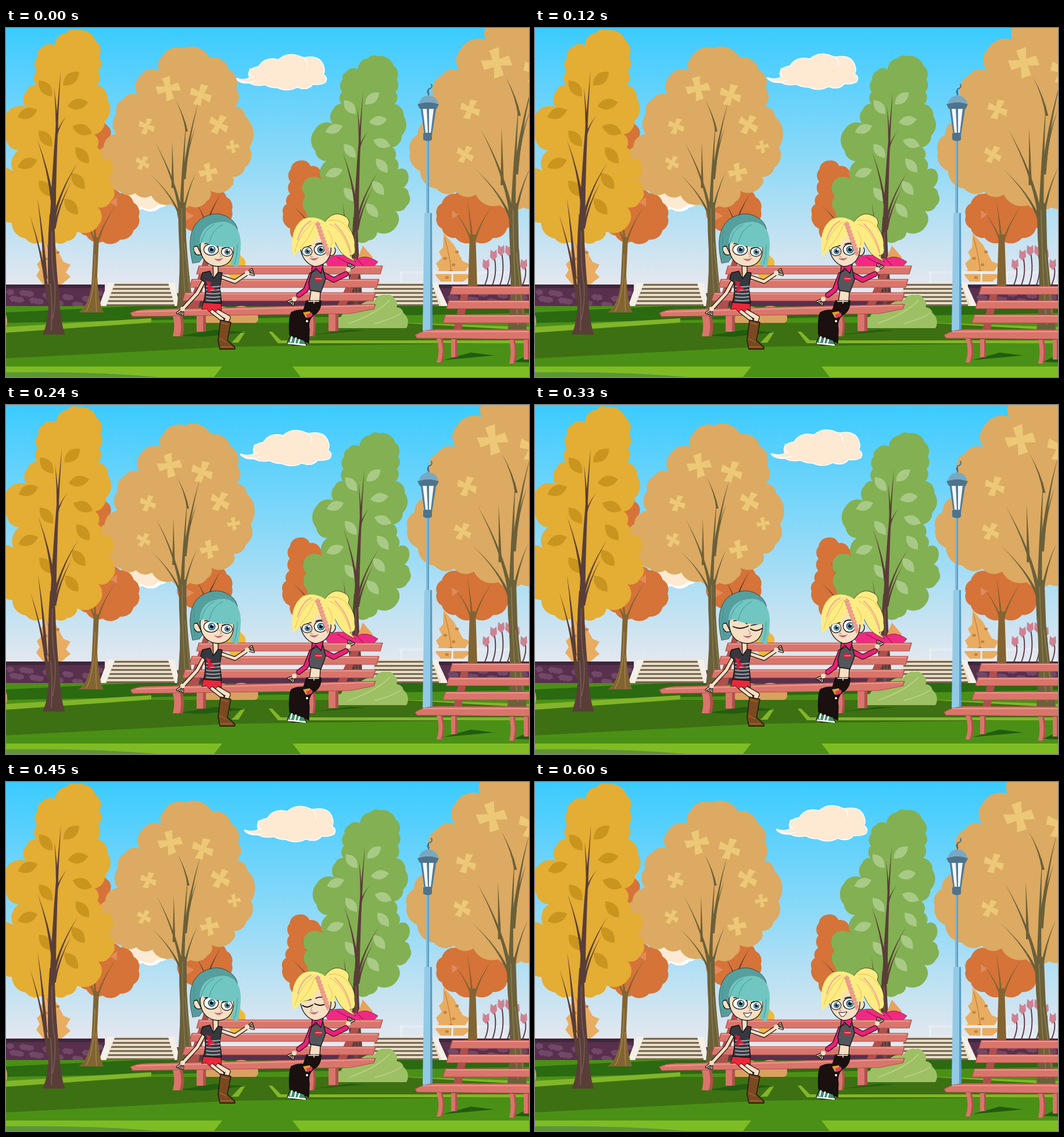
Recreate the animation shown at these times as an HTML page with a canvas. Size 900 px wide and 600 px high, loop 690 ms.

```html
<!DOCTYPE html>
<html lang="en">
<head>
<meta charset="utf-8">
<title>Park bench</title>
<style>
  html, body { margin: 0; width: 100%; height: 100%; overflow: hidden; }
  canvas { display: block; }
</style>
</head>
<body>
<canvas id="stage" width="900" height="600"></canvas>
<script>
const ctx = document.getElementById('stage').getContext('2d');
ctx.lineCap = ctx.lineJoin = 'round';

const INK = '#15100f', SKIN = '#f6dfc3', WOOD = '#da756c', EDGE = '#ae504c';
const RUST = '#d57338', BARK = '#826432', OLIVE = '#6b603a', BROWN = '#593e38';

const fill = (color, d) => { ctx.fillStyle = color; ctx.fill(new Path2D(d)); };
const line = (color, width, d) => {
  ctx.strokeStyle = color;
  ctx.lineWidth = width;
  ctx.stroke(new Path2D(d));
};
const inked = (color, d, width = 1.3) => { fill(color, d); line(INK, width, d); };
const limb = (color, width, d) => { line(INK, width + 2.4, d); line(color, width, d); };
const oval = (color, x, y, rx, ry = rx) => {
  ctx.fillStyle = color;
  ctx.beginPath();
  ctx.ellipse(x, y, rx, ry, 0, 0, 7);
  ctx.fill();
};

// Clockwise key points joined by rows of small outward bumps.
function scallop(color, p, { size = 30, flat = false } = {}) {
  let d = `M${p[0]} ${p[1]}`;
  for (let i = 0; i < p.length - (flat ? 2 : 0); i += 2) {
    const dx = p[(i + 2) % p.length] - p[i], dy = p[(i + 3) % p.length] - p[i + 1];
    const length = Math.hypot(dx, dy), n = Math.max(1, Math.round(length / size)), r = length / n * 0.75;
    for (let k = 1; k <= n; k++) d += `A${r} ${r} 0 0 1 ${p[i] + dx * k / n} ${p[i + 1] + dy * k / n}`;
  }
  fill(color, d + 'Z');
}

// Bumpy ellipse.
function puff(color, x, y, rx, ry, bumps) {
  const p = [];
  for (let i = 0; i < bumps; i++) {
    const a = i * 2 * Math.PI / bumps;
    p.push(x + rx * 0.95 * Math.cos(a), y + ry * 0.95 * Math.sin(a));
  }
  scallop(color, p, { size: 99 });
}

// Tapering branches from tip to foot.
function twigs(color, list) {
  for (const [x, y, u, v] of list) {
    const h = 1 + Math.hypot(u - x, v - y) * 0.016, bx = u * 0.75 + x * 0.25, by = (y + v) / 2;
    fill(color, `M${x} ${y}Q${bx - h / 2} ${by} ${u - h} ${v}H${u + h}Q${bx + h / 2} ${by} ${x} ${y}Z`);
  }
}

function at(x, y, turn, scale, draw) {
  ctx.save();
  ctx.translate(x, y);
  ctx.rotate(turn);
  ctx.scale(scale, scale);
  draw();
  ctx.restore();
}
const leaf = (color, x, y, degrees) => at(x, y, degrees * Math.PI / 180, 1,
  () => fill(color, 'M-18 0Q0-19 18 0Q0 18-18 0Z'));
const blossom = (x, y, r, turn) => at(x, y, turn, r, () => {
  for (let i = 0; i < 4; i++, ctx.rotate(Math.PI / 2)) fill('#ecc877', 'M-.17 .17L-.32-.9L.36-1L.17 .17Z');
});

function track(t, keys) {
  const i = Math.max(1, keys.findIndex(k => k[0] >= t));
  const [[t0, a], [t1, b]] = [keys[i - 1], keys[i]];
  return a + (b - a) * (t - t0) / (t1 - t0);
}

// Place a tree and lean it from its base; shift is the lean at its own y = 0.
function plant(x, y, scale, shift, base, draw) {
  ctx.save();
  ctx.transform(scale, 0, -scale * shift / base, scale, x + scale * shift, y);
  draw();
  ctx.restore();
}

function sky(t) {
  const g = ctx.createLinearGradient(0, 0, 0, 450);
  ['#3bcbff', '#8dd9f8', '#e7e8ee'].forEach((c, i) => g.addColorStop(i / 2, c));
  ctx.fillStyle = g;
  ctx.fillRect(0, 0, 900, 600);
  puff('#fff', 243, 298, 38, 14, 7);
  puff('#fee9d2', 240, 295, 36, 13, 7);
  const cloud = 'M396 87Q410 92 420 86Q413 70 435 67Q446 49 469 55Q487 39 512 52Q540 46 546 66Q549 74 545 80Q554 85 549 93Q540 98 528 96Q519 108 501 101Q486 110 467 102Q454 102 446 97Q430 100 419 94Q403 95 396 87Z';
  at(t / 30, -t / 120, 0, 1, () => {
    line('#fff', 3, cloud);
    fill('#fee9d2', cloud);
    line('#fff', 1.5, 'M397 88Q415 97 430 91M425 86Q416 81 420 70M512 50Q520 58 518 65');
  });
}

function backTrees(t) {
  puff(RUST, 163, 187, 17, 27, 7);
  puff(RUST, 174, 324, 57, 46, 11);
  puff(RUST, 342, 313, 49, 40, 10);
  puff(RUST, 806, 323, 68, 46, 12);
  plant(0, 0, 1, track(t, [[0, 0], [330, -4], [600, -4]]), 440, () => {
    scallop(RUST, [506, 228, 542, 247, 550, 290, 540, 365, 505, 369, 489, 345, 477, 320, 489, 285, 490, 243], { size: 24 });
    twigs(BROWN, [[510, 268, 531, 340], [494, 306, 528, 350], [537, 264, 526, 312]]);
  });
  twigs(BROWN, [[328, 302, 348, 350], [370, 285, 344, 345]]);
  fill('#e28a5a', 'M309 315l15 8-14 8ZM179 300l12-9 0 16ZM767 314l13 6-12 8Z');
  for (const x of [155, 803]) twigs(BARK, [[x + 34, 305, x, 378], [x - 33, 312, x, 374], [x - 9, 296, x, 380]]);
  fill(BARK, 'M125 489Q147 473 148 425L151 360H160L157 425Q159 472 168 489ZM798 355H808L811 445H795Z');
  line('#a98a50', 1.2, 'M153 390Q153 460 138 487M155 430Q154 470 156 488');
}

const leafBush = (x, y) => at(x, y, 0, 1, () => {
  fill('#e8ad61', 'M12 0L30 20L45 48L57 53L49 66L57 74L40 88H11L-2 72L4 62L-1 52L9 42L4 32L11 24Z');
  line('#c58342', 1.4, 'M14 8Q25 45 27 87');
  for (let i = 0; i < 5; i++) oval('#c58342', 24 + 11 * Math.cos(i * 2.6), 32 + i * 11, 3.2, 2.5);
});

function wall() {
  leafBush(54, 354);
  leafBush(741, 353);
  fill('#e3ebf2', 'M676 418H900V423H676ZM676 436H900V441H676Z');
  for (let x = 680; x < 900; x += 44) line('#e9f1f5', 3, `M${x} 420V440`);
  for (let i = 0; i < 6; i++) {
    const x = 826 + i * 13, y = 380 + 4 * (i - 2.5) ** 2;
    line('#613d4d', 2, `M${x} ${y}Q${x + 8} 420 ${x - 3} 444`);
    fill('#cd8292', `M${x - 5} ${y - 8}l5 4 5-4 1 12-6 7-6-6Z`);
  }
  fill('#58304d', 'M0 445H170V478H0ZM745 445H900V478H745ZM290 456H640V478H290Z');
  for (let i = 0; i < 110; i++) {
    const x = i * 17 % 907, y = 453 + i * 13 % 23;
    if (x < 165 || x > 748) fill('#724767', `M${x} ${y}l6-4 7 2 1 6-9 3Z`);
  }
  fill('#3f263b', 'M0 441H170V447H0ZM745 441H900V447H745Z');
  fill('#e7ddc7', 'M175 438H290L299 479H160ZM632 438H737L763 486H632Z');
  for (let i = 0; i < 6; i++) {
    const y = 440 + i * 7;
    fill('#766651', `M${187 - i * 2.7} ${y}H${280 + i * 2}v3H${186 - i * 2.7}ZM634 ${y}H${734 + i * 2.2}v3H634Z`);
  }
  fill('#f4f0e8', 'M175 438H187L171 479H160ZM279 438H290L299 479H291ZM733 438H742L764 486H753Z');
}

function lawn() {
  fill('#4b9016', 'M0 478H900V600H0Z');
  fill('#2b6a10', 'M0 489L230 478H900V490L0 507Z');
  fill('#83b52a', 'M0 514L250 499V506L0 524ZM660 506L900 514V521L660 512Z');
  fill('#3d7012', 'M0 524L250 507H680L900 520V541L390 548L0 568Z');
  fill('#83b52a', 'M406 522H412L400 541H388ZM452 522H458L473 537H900V542H468Z');
  fill('#7ebc25', 'M0 582H372L358 600H0ZM493 582H900V600H507Z');
  fill('#5d9535', 'M0 592Q150 590 262 600H0Z');
  oval('#d8a466', -2, 504, 4, 12);
}

function roundTree() {
  scallop('#dcaa62', [304, 35, 350, 50, 384, 72, 396, 104, 394, 135, 412, 152, 419, 205, 411, 240, 390, 256, 388, 272, 352, 280, 345, 298, 316, 306, 284, 303, 250, 288, 195, 280, 172, 255, 158, 228, 168, 205, 190, 182, 190, 148, 202, 122, 228, 115, 228, 86, 264, 72, 268, 50], { size: 36 });
  [[279, 104], [335, 115], [366, 166], [348, 248], [242, 169], [235, 232], [390, 204]]
    .forEach(([x, y], i) => blossom(x, y, 21 - i * 1.6, [-0.2, 0.35, 0.5][i % 3]));
  twigs(OLIVE, [[331, 128, 306, 260], [292, 124, 311, 178], [310, 160, 302, 320], [257, 197, 300, 315], [286, 195, 287, 275], [249, 252, 300, 325], [326, 170, 308, 245], [327, 248, 305, 320]]);
  fill(OLIVE, 'M296 300H309L310 360Q313 410 323 490H293Q302 420 297 350Z');
  line('#8c8050', 1.2, 'M302 310Q303 400 309 470M307 370Q312 420 317 460');
}

function tallTree(crown, leaves) {
  scallop(crown, [122, 4, 154, 22, 160, 50, 156, 98, 174, 122, 170, 160, 152, 183, 162, 227, 180, 229, 174, 262, 184, 275, 180, 298, 158, 308, 160, 338, 122, 350, 105, 366, 60, 368, 34, 362, 10, 335, -18, 310, -20, 248, 12, 246, 22, 210, 0, 190, 0, 148, 34, 136, 36, 108, 52, 98, 54, 50, 62, 34, 84, 30, 104, 8]);
  for (let i = 0; i < 6; i++) leaf(leaves, 112 + 20 * Math.sin(i * Math.PI / 5), 87 + 44 * i, Math.min(50, 30 * i - 40));
  for (let i = 0; i < 5; i++) leaf(leaves, i % 2 ? 37 : 68, 104 + 43 * i, i % 2 ? -20 : 50);
  twigs(BROWN, [[94, 74, 80, 345], [83, 103, 88, 178], [104, 151, 87, 185], [54, 192, 80, 300], [123, 232, 82, 330], [112, 265, 83, 345], [41, 322, 73, 470], [54, 292, 68, 430]]);
  fill(BROWN, 'M75 320H83Q85 400 91 455Q94 510 102 527H63Q75 502 73 450Q70 385 75 320Z');
  line('#7a5a58', 1.6, 'M79 350Q78 410 84 440Q86 475 80 500M76 440Q80 460 78 520');
}

function shrubs() {
  puff('#edba3b', 396, 410, 16, 23, 7);
  fill('#e9a25c', 'M604 400L614 374L631 394L626 404Z');
  inked('#f02a82', 'M548 398Q572 383 604 397Q620 388 640 402L633 410H555Z', 0.5);
  line('#b81561', 1.5, 'M602 395L615 409M570 394L590 405');
  scallop('#9dc064', [556, 516, 576, 497, 634, 470, 655, 459, 668, 465, 672, 480, 684, 490, 689, 516], { flat: true });
  line('#c3d78c', 1.3, 'M590 508Q640 490 660 468M635 508Q665 500 680 490');
  scallop('#d9a15f', [345, 507, 352, 486, 422, 484, 434, 500, 428, 507], { flat: true });
}

function plank(d) { fill(WOOD, d); line(EDGE, 1.2, d); }
function slat(x, y, end, height) {
  plank(`M${x} ${y}H${end}l-4 ${height}H${x - 4}Z`);
  line('#eb968b', 2, `M${x + 2} ${y + 2}H${end - 4}`);
}
function leg(x, y, width, height, bend = 0) {
  const d = w => `M${x} ${y}h${w}q${bend} ${height / 2} 0 ${height}h${-w}q${bend} ${-height / 2} 0 ${-height}Z`;
  fill(EDGE, d(width));
  fill(WOOD, d(width * 0.7));
}

function bench() {
  fill('#225c10', 'M298 529L360 519L415 523L340 531ZM521 528L590 519L620 520Z');
  fill(EDGE, 'M342 392H352L330 486H312ZM596 420H609L585 478H570Z');
  for (let i = 0; i < 3; i++) slat(332 - i * 12, 409 + i * 23, 648 - i * 6, 14);
  leg(287, 495, 17, 35, 5);
  leg(328, 493, 16, 29);
  leg(519, 492, 12, 38, 4);
  leg(555, 490, 17, 31);
  plank('M214 490Q222 485 240 484L636 475L633 483L592 491L218 496Z');
  line('#eb968b', 2, 'M225 488L632 477');
}

function rightBench() {
  fill('#225c10', 'M752 571L800 558L840 563ZM874 574L900 562V575Z');
  fill(EDGE, 'M786 443H799L784 519H770Z');
  for (let i = 0; i < 3; i++) slat(768 - i * 6, 444 + i * 24.5, 910, 14);
  leg(741, 534, 10, 41, 7);
  leg(766, 535, 10, 31);
  leg(866, 536, 10, 41, 5);
  leg(891, 536, 10, 34);
  plank('M704 528Q716 520 740 518L902 519V535L707 533Z');
  line('#eb968b', 2, 'M718 522L900 522');
}

function lamp() {
  line('#4b7289', 2, 'M727 119V105Q735 103 732 97M727 106Q723 111 728 113');
  fill('#7cb9d9', 'M723 190H728V320H723Z');
  fill('#93cae6', 'M720 318H733V520Q727 524 717 520Z');
  fill('#5b9ac0', 'M730 318H733L734 521H730ZM726 190H728V318H726Z');
  fill('#557b95', 'M713 134H741L733 184H720Z');
  fill('#f4f8fb', 'M717 138H724L726 180H722ZM728 138H736L731 180H728Z');
  fill('#4e748d', 'M708 131Q727 124 745 131L741 139H712ZM718 181H733V192Q727 197 718 192Z');
  fill('#77a9c4', 'M710 130Q715 116 727 116Q741 117 744 130Q727 125 710 130Z');
}

function eye(x, y, rx, ry, mode) {
  if (mode === 'shut') {
    line(INK, 1.8, `M${x - rx} ${y}Q${x} ${y + 6} ${x + rx} ${y}m0 0l2-1`);
    return;
  }
  const grow = mode === 'wide' ? 1 : 0;
  const top = y - grow;
  oval(INK, x, top, rx + 1.2, ry + 1.2 + grow);
  oval('#fff', x, top, rx, ry + grow);
  [['#20485a', 0.72], ['#58a7bd', 0.58], ['#111', 0.34]].forEach(([c, k]) => oval(c, x + 1, top, ry * k));
  oval('#fff', x + 3, top - 3, 1.6);
}

function mouth(x, y, grin) {
  if (grin) inked('#fff', `M${x - 7} ${y - 2}Q${x} ${y} ${x + 7} ${y - 3}Q${x + 3} ${y + 7} ${x - 3} ${y + 5}Z`, 1);
  else {
    fill('#d9788c', `M${x - 6} ${y - 1}Q${x} ${y - 2} ${x + 6} ${y - 2}Q${x + 1} ${y + 5} ${x - 6} ${y - 1}Z`);
    line('#703448', 0.8, `M${x - 7} ${y - 2}Q${x} ${y + 1} ${x + 7} ${y - 3}`);
  }
}

function hand(x, y, dx, dy) {
  for (let i = -1; i < 3; i++) limb(SKIN, 1.8, `M${x} ${y}l${dx - dy * i * 0.35} ${dy + dx * i * 0.35}`);
  oval(SKIN, x, y, 4);
}

function tealGirl(eyes, grin) {
  inked('#559f9e', 'M321 404Q308 350 334 329Q365 309 390 331Q401 342 398 357L340 392L333 402Z', 0.6);
  limb(SKIN, 5, 'M343 430Q335 445 329 456L306 481');
  hand(304, 483, -3, 9);
  limb(SKIN, 5, 'M371 428L394 436L412 424');
  hand(415, 421, 9, -3);
  limb(SKIN, 7, 'M357 484L382 498L377 510');
  limb(SKIN, 5, 'M354 487L372 501');
  inked('#7b491f', 'M369 502L387 506Q383 527 381 537L394 549V552H368L365 537Z');
  line('#b57936', 1, 'M371 507L382 510M368 534L379 540M369 548H389');
  inked(SKIN, 'M356 402H365V422L357 432Z');
  inked('#36383f', 'M338 421L351 418L357 431L365 420L372 421L368 446L371 473L340 472Q345 452 342 437L335 432Z');
  for (let y = 444; y < 472; y += 6) line('#9fa8af', 1.8, `M345 ${y}Q356 ${y + 2} 368 ${y}`);
  fill('#df1d3b', 'M344 434L354 438L350 441L364 452L351 449L353 457L346 451L348 445Z');
  inked('#e8283a', 'M340 472L370 474L371 486L365 483L361 488L355 484L350 488L345 483L337 484Z', 0.8);
  inked(SKIN, 'M329 375Q320 375 324 384Q327 393 336 389Z');
  inked(SKIN, 'M334 378Q333 350 363 347Q393 349 392 382Q389 409 365 410Q337 408 334 378Z');
  eye(353, 381, 12, 9, eyes);
  eye(380, 385, 9, 7, eyes);
  line(INK, 1.7, 'M342 371Q354 368 365 376M372 379L390 375');
  line('#ad846d', 1, 'M367 386l4 7-3 1');
  mouth(366, 399, grin);
  fill('#71c6c2', 'M333 371Q334 334 375 333Q403 336 404 370Q404 390 399 411Q390 409 386 405Q394 391 392 377Q364 378 346 370Q340 367 333 371Z');
  line('#3f9698', 1, 'M335 372Q340 346 358 338M350 369Q355 345 373 338M398 373Q398 393 393 406M324 350Q321 374 325 397');
}

function blondeGirl(eyes, grin) {
  const hair = '#fdec83', pink = '#eb2077';
  inked(hair, 'M548 334Q560 317 574 320Q595 326 589 340Q602 361 600 374Q604 391 592 391Q599 399 602 402Q580 394 572 379Z', 0.7);
  line('#e9b94e', 1, 'M557 337Q582 347 596 399M555 331Q580 326 592 350');
  line('#f0aa99', 2, 'M566 337Q587 357 593 386');
  limb(pink, 7, 'M546 424L564 433L585 423');
  hand(589, 415, 4, -8);
  limb(pink, 7, 'M526 424Q520 440 516 450L504 459');
  hand(496, 466, -5, 8);
  inked(SKIN, 'M525 450L541 452L540 471H522Z');
  inked('#53565b', 'M526 420L545 411L550 432L542 454L523 451L521 438Z');
  inked(pink, 'M527 404L546 407L542 422L533 413L526 421Z');
  fill('#d81f35', 'M531 428Q537 424 541 429L546 431Q538 440 531 432Z');
  line('#fff', 0.8, 'M533 431H543');
  inked('#19100f', 'M517 469L542 469Q543 486 529 494Q519 502 522 518L521 542L488 528Q486 500 491 489Q500 484 512 485Z');
  line('#c7c0b8', 2, 'M521 470H538M530 468v5');
  fill('#e5a02d', 'M511 489l12-2 3 9-10 2Z');
  fill('#de3b65', 'M516 493l10-4 2 5-9 5Z');
  oval('#fff', 518, 504, 2);
  inked('#3e8e69', 'M489 530L513 537L517 545H492L484 541Z');
  line('#fff', 2.5, 'M492 531l-2 8M499 533l-2 8M505 536l-2 6M486 542L515 545');
  inked(SKIN, 'M557 378Q567 374 567 383Q565 393 557 391Z');
  inked(SKIN, 'M506 375Q512 349 537 350Q562 355 559 384Q555 408 531 410Q509 403 506 375Z');
  eye(518, 384, 8, 7, eyes);
  eye(541, 381, 10, 9, eyes);
  line(INK, 1.5, 'M509 377L525 374M533 372Q542 367 551 373');
  line('#ad846d', 1, 'M527 386l-3 7 4 1');
  mouth(530, 398, grin);
  fill(hair, 'M494 394Q486 345 512 328Q538 320 557 341Q571 360 564 381Q558 377 555 374L552 392Q544 363 535 357Q531 374 512 377Q503 383 494 394Z');
  line('#eabc56', 1, 'M497 384Q506 350 530 333M506 378Q523 360 532 335M554 348Q566 365 559 374');
  line('#f0aa99', 2, 'M502 364Q509 339 525 332');
  for (let i = 0; i < 9; i++) {
    const x = 536 + i * 2.1, y = 337 + i * 6;
    fill('#eda08f', `M${x - 4} ${y}l4-5 5 4-1 6-4 3Z`);
    line('#cc796e', 0.6, `M${x - 4} ${y}l5 3 4-4`);
  }
}

function render(t) {
  const middle = track(t, [[0, 0], [330, 4.5], [450, 4.5], [600, -0.5]]);
  const left = track(t, [[0, 0], [180, 2.5], [330, 2], [450, 0.5], [600, 3]]);
  const right = track(t, [[0, 0], [330, -9.3], [450, -8.5], [600, -11.4]]);
  sky(t);
  wall();
  lawn();
  backTrees(t);
  plant(0, 0, 1, middle, 490, roundTree);
  plant(532, 45, 0.875, middle, 527, () => tallTree('#83b052', '#a8ca86'));
  plant(0, 0, 1, left, 527, () => tallTree('#e4ad33', '#c9951f'));
  plant(501, -68, 1.23, right, 490, roundTree);
  shrubs();
  lamp();
  bench();
  rightBench();
  const grin = t >= 570;
  tealGirl(t < 270 || grin ? 'open' : t < 390 ? 'shut' : 'wide', grin);
  blondeGirl(t < 300 || grin ? 'open' : t < 420 ? 'wide' : 'shut', grin);
}

const LOOP = 690, STEP = 30, LAST = 600;
function tick() {
  const t = performance.now() % LOOP;
  render(Math.min(LAST, Math.floor(t / STEP) * STEP));
  requestAnimationFrame(tick);
}
tick();
</script>
</body>
</html>
```
